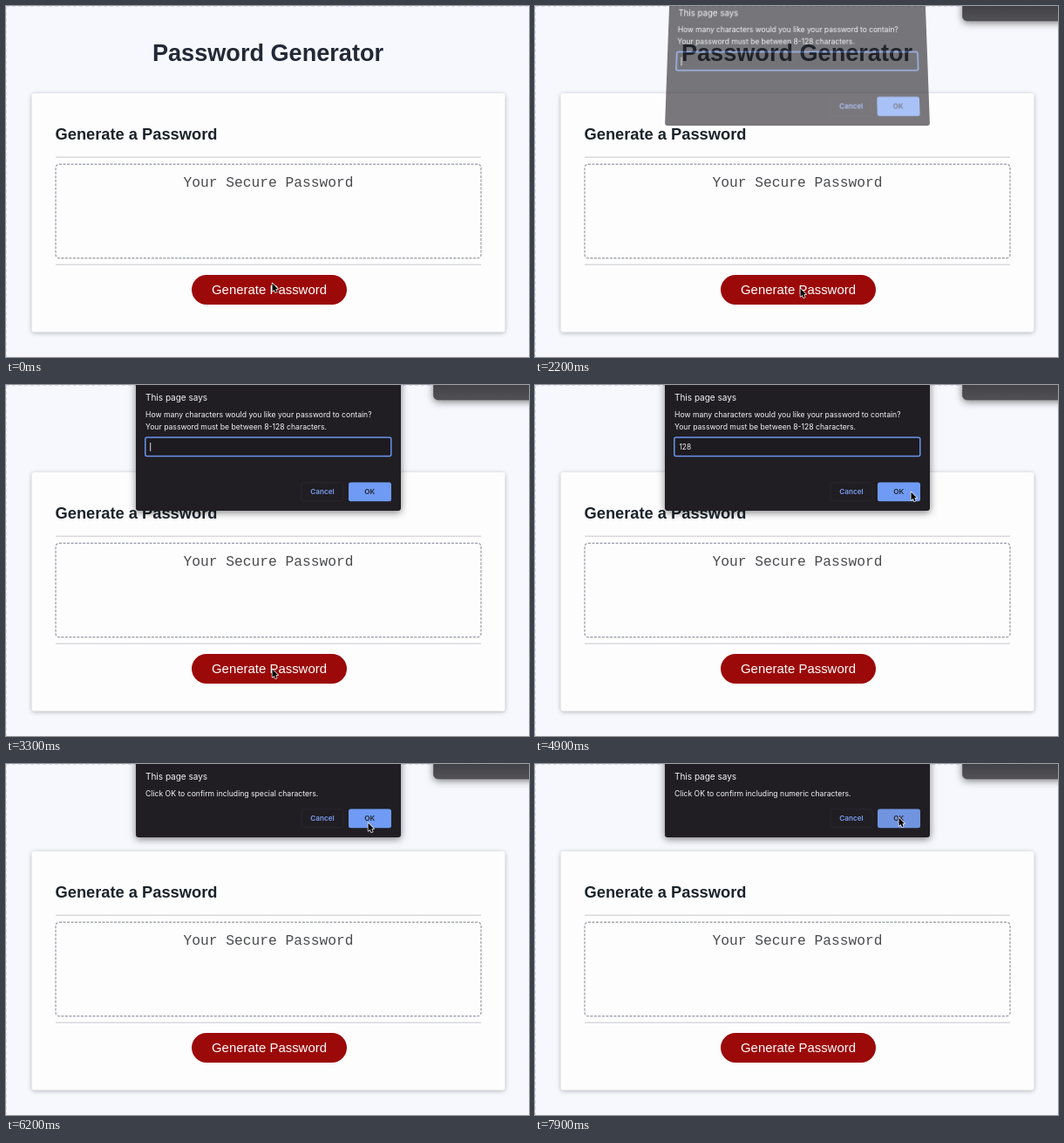
Recreate the animation shown at these times as an HTML page. Size 600 by 402 pixels, loop 8000 ms.

```html
<!DOCTYPE html>
<html lang="en">
<head>
<meta charset="utf-8">
<title>Password Generator</title>
<style>
  html, body { margin: 0; width: 100%; height: 100%; overflow: hidden; background: #f7f8fd; }
  svg { position: absolute; left: 0; top: 0; width: 600px; height: 402px; overflow: visible; }
  text { font-family: "Liberation Sans", Arial, sans-serif; }
  .mid { text-anchor: middle; }
  .bold { font-weight: 700; fill: #1a232b; }
  .shadow { filter: drop-shadow(0 1px 2.5px rgba(0, 0, 0, .28)); }
  #panel { filter: drop-shadow(0 2px 4px rgba(0, 0, 0, .5)); }
  #dialog { filter: drop-shadow(0 2px 4px rgba(0, 0, 0, .5)); }
  #dialog text { font-family: Inter, sans-serif; font-size: 8.65px; fill: #f4f4f6; }
  #dialog .action { font-size: 8.2px; font-weight: 600; }
</style>
</head>
<body>
<svg viewBox="0 0 600 402">
  <path d="M0 .5H600M.5 0V402" stroke="#d9dcf3" stroke-dasharray="4 3"/>
  <text class="bold mid" x="300.5" y="62.8" font-size="27.1" style="fill:#222936">Password Generator</text>
  <rect class="shadow" x="29.5" y="100" width="543" height="273.5" rx="3" fill="#fefdfe"/>
  <text class="bold" x="56.5" y="153.2" font-size="18.3">Generate a Password</text>
  <path d="M57 173.3H545M57 296.3H545" stroke="#d9d9dc" stroke-width="1.4"/>
  <rect x="57" y="181.2" width="488" height="107.6" rx="4" fill="none" stroke="#a3a8ae" stroke-width="1.4" stroke-dasharray="3 1.5"/>
  <text class="mid" x="301" y="207.3" font-size="16.28" fill="#484a4c" style="font-family:'Liberation Mono',monospace">Your Secure Password</text>
  <rect x="213" y="308" width="178" height="34" rx="17" fill="#9c0909"/>
  <text class="mid" x="302" y="330.2" font-size="14.95" fill="#fff">Generate Password</text>
  <g id="panel">
    <linearGradient id="metal" x2="0" y2="1"><stop stop-color="#39383c"/><stop offset="1" stop-color="#525155"/></linearGradient>
    <rect x="490.5" y="-10" width="130" height="27" rx="5" fill="url(#metal)" stroke="#4a494d" stroke-width=".6"/>
  </g>
</svg>

<svg id="dialog" viewBox="0 0 600 402">
  <rect id="sheet" x="149" y="-20" width="304" height="164" rx="3" fill="#201e23"/>
  <text x="160" y="17.6" style="font-size:10px">This page says</text>
  <text id="line1" x="160" y="37.3"></text>
  <g id="prompt">
    <text x="160" y="51.2">Your password must be between 8-128 characters.</text>
    <rect x="159.8" y="60" width="282" height="21.6" rx="2" fill="#1d1b20" stroke="#6a94ec" stroke-width="1.5"/>
    <text id="typed" x="165.5" y="73.8" style="font-size:8.3px"></text>
    <path id="caret" d="M0 66V76" stroke="#f0f0f2" stroke-width=".9"/>
  </g>
  <g id="actions">
    <rect x="339" y="111.8" width="48" height="21.2" rx="2.5" fill="none" stroke="#2b292f" stroke-width=".9"/>
    <text class="action mid" x="363" y="125.3" style="fill:#7a9df0">Cancel</text>
    <rect id="ok" x="393" y="111.5" width="49" height="21.8" rx="2.5"/>
    <text class="action mid" x="417.3" y="125.3" style="fill:#24262f">OK</text>
  </g>
</svg>

<svg viewBox="0 0 600 402">
  <path id="cursor" d="M.5 .5V9.8L2.7 7.9 4.1 11.2 5.7 10.5 4.3 7.3H7.1Z" stroke="#fff" stroke-width="1.4" stroke-linejoin="round" paint-order="stroke"/>
</svg>

<script>
const LOOP = 8000, FADE = 250;
const $ = id => document.getElementById(id);
const clamp = v => Math.max(0, Math.min(1, v));

const dialogs = [
  { open: 2050, close: 5150, bottom: 144, text: "How many characters would you like your password to contain?" },
  { open: 5400, close: 6850, bottom: 84, text: "Click OK to confirm including special characters." },
  { open: 7100, close: 9000, bottom: 84, text: "Click OK to confirm including numeric characters." }
];
const presses = [[5020, 5150], [6720, 6850], [7800, 8000]];
const keyTimes = [3600, 3800, 4000];

// time, x, y of the pointer tip
const path = [
  [0, 305, 317], [100, 305, 317], [500, 304, 323], [2200, 304, 323], [2900, 305, 325],
  [4100, 305, 325], [4750, 431, 122], [5400, 431, 122], [5900, 415, 67],
  [6300, 415, 67], [6700, 417, 61], [LOOP, 417, 61]
];

function pointerAt(t) {
  const i = path.findIndex(p => p[0] > t);
  const [t0, x0, y0] = path[i - 1], [t1, x1, y1] = path[i];
  const u = (t - t0) / (t1 - t0), e = u * u * (3 - 2 * u);
  return [x0 + (x1 - x0) * e, y0 + (y1 - y0) * e];
}

function drawDialog(t) {
  const d = dialogs.find(d => t >= d.open && t < d.close + FADE);
  $("dialog").style.display = d ? "" : "none";
  if (!d) return;
  const shown = Math.min(clamp((t - d.open) / FADE), 1 - clamp((t - d.close) / FADE));
  const hidden = (1 - shown) / .4;
  const isPrompt = d === dialogs[0];
  const style = $("dialog").style;
  style.opacity = shown;
  style.filter = hidden ? "none" : "";
  style.transformOrigin = `301px ${d.bottom}px`;
  style.transform = hidden ? `translateY(${-7 * hidden}px) perspective(500px) rotateX(${7 * hidden}deg) scaleY(${1 + .036 * hidden})` : "none";
  $("sheet").setAttribute("height", d.bottom + 20);
  $("line1").textContent = d.text;
  $("prompt").style.display = isPrompt ? "" : "none";
  $("actions").setAttribute("transform", `translate(0 ${d.bottom - 144})`);
  $("ok").setAttribute("fill", presses.some(([a, b]) => t >= a && t < b) ? "#7094e0" : "#6f9bf4");

  const count = keyTimes.filter(k => t >= k).length;
  $("typed").textContent = "128".slice(0, count);
  $("caret").setAttribute("transform", `translate(${165.7 + count * 4.7} 0)`);
  $("caret").style.display = (t - 2100) % 1000 < 500 ? "" : "none";
}

function frame(now) {
  const t = now % LOOP;
  $("panel").style.display = t >= 1000 ? "" : "none";
  drawDialog(t);
  $("cursor").setAttribute("transform", `translate(${pointerAt(t)})`);
  requestAnimationFrame(frame);
}
frame(performance.now());
</script>
</body>
</html>
```
